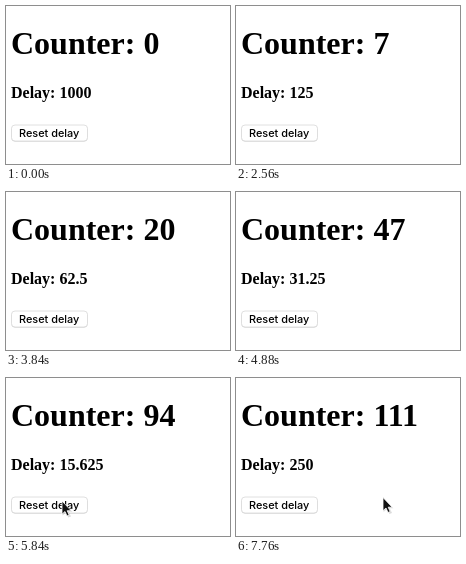
Recreate the animation shown at these times as an HTML page. Size 224 px wide and 158 px high, loop 8000 ms.

```html
<!DOCTYPE html>
<html lang="en">
<head>
<meta charset="utf-8">
<title>Counter</title>
<style>
  html, body { margin: 0; width: 100%; height: 100%; overflow: hidden; background: #fff; }
  svg { display: block; width: 224px; height: 158px; }
  .heading { font: bold 32px "Liberation Serif", Times, serif; }
  .delay { font: bold 16px "Liberation Serif", Times, serif; }
  .label { font: 500 10.9px Inter, sans-serif; }
</style>
</head>
<body>
<svg viewBox="0 0 224 158">
  <defs>
    <linearGradient id="pressed" x2="0" y2="1">
      <stop stop-color="#69b2fa"/>
      <stop offset="1" stop-color="#0d6fff"/>
    </linearGradient>
  </defs>
  <text class="heading" x="5" y="48" id="counter"></text>
  <text class="delay" x="5" y="92" id="delay"></text>
  <rect x="5.5" y="119.5" width="76" height="16" rx="3.5" fill="#cacaca"/>
  <rect id="face" x="5.5" y="119" width="76" height="16" rx="3.5" stroke="#d8d8d8" stroke-width=".8"/>
  <text class="label" id="label" x="13" y="131">Reset delay</text>
  <g id="cursor">
    <circle id="ring" r="24" fill="none" stroke="#333" stroke-width="2"/>
    <path d="M.6 2V14.5L4 11.5L6.3 16.6L9 15.5L6.7 10.8H10.5Z" fill="#000" opacity=".14"/>
    <path d="M0 0V13.2L3 10.5L5 15L7.2 14L5.2 9.7H9.2Z" fill="#111" stroke="#fff" stroke-width=".8"/>
  </g>
</svg>
<script>
const LOOP = 8000, STEP = 80;
const SPEED = 0.96;       // playback time per timer time
const OVERHEAD = 0.3;     // lateness of every count
const MIN_INTERVAL = 16;  // shortest interval the counter reaches
const RESET = 6055;

const el = id => document.getElementById(id);
const mix = (a, b, u) => a + (b - a) * u;

// Progress from 0 to 1 between two times, eased at both ends
function ease(t, from, to) {
  const u = Math.min(1, Math.max(0, (t - from) / (to - from)));
  return u * u * (3 - 2 * u);
}

// The delay halves about once a second, each round a touch shorter than the last
const roundStart = n => 490 + 961.1 * n - 0.08 * n * n;

// Two competing timers: a change of delay restarts the counter's interval
function stateAt(t) {
  let delay = 1000, count = 0;

  const run = (from, to) => {
    const interval = Math.max(Math.floor(delay), MIN_INTERVAL) * SPEED + OVERHEAD;
    count += Math.max(0, Math.floor((Math.min(t, to) - from) / interval));
  };

  for (let n = -1; roundStart(n) <= t; n++) {
    const from = roundStart(n), to = roundStart(n + 1);
    const resets = RESET > from && RESET < to;
    run(from, resets ? RESET : to);
    if (resets && t >= RESET) {
      delay = 1000;
      run(RESET, to);
    }
    if (t >= to) delay /= 2;
  }
  return { delay, count };
}

// Rises from below onto the button, then leaves to the right
function pointerAt(t) {
  const enter = ease(t, 4880, 5320), leave = ease(t, 6240, 6760);
  return [mix(mix(88, 56, enter), 147, leave), mix(mix(162, 123, enter), 119.5, leave)];
}

function draw(time) {
  const t = Math.floor((time % LOOP) / STEP) * STEP;
  const { delay, count } = stateAt(t);
  const pressed = t >= RESET - STEP && t < RESET;

  el("counter").textContent = "Counter: " + count;
  el("delay").textContent = "Delay: " + delay;
  el("face").setAttribute("fill", pressed ? "url(#pressed)" : "#fff");
  el("label").setAttribute("fill", pressed ? "#fff" : "#000");
  el("ring").setAttribute("visibility", pressed ? "visible" : "hidden");
  el("cursor").setAttribute("transform", `translate(${pointerAt(t)})`);
}

const began = performance.now();
function frame() {
  draw(performance.now() - began);
  requestAnimationFrame(frame);
}
frame();
</script>
</body>
</html>
```
